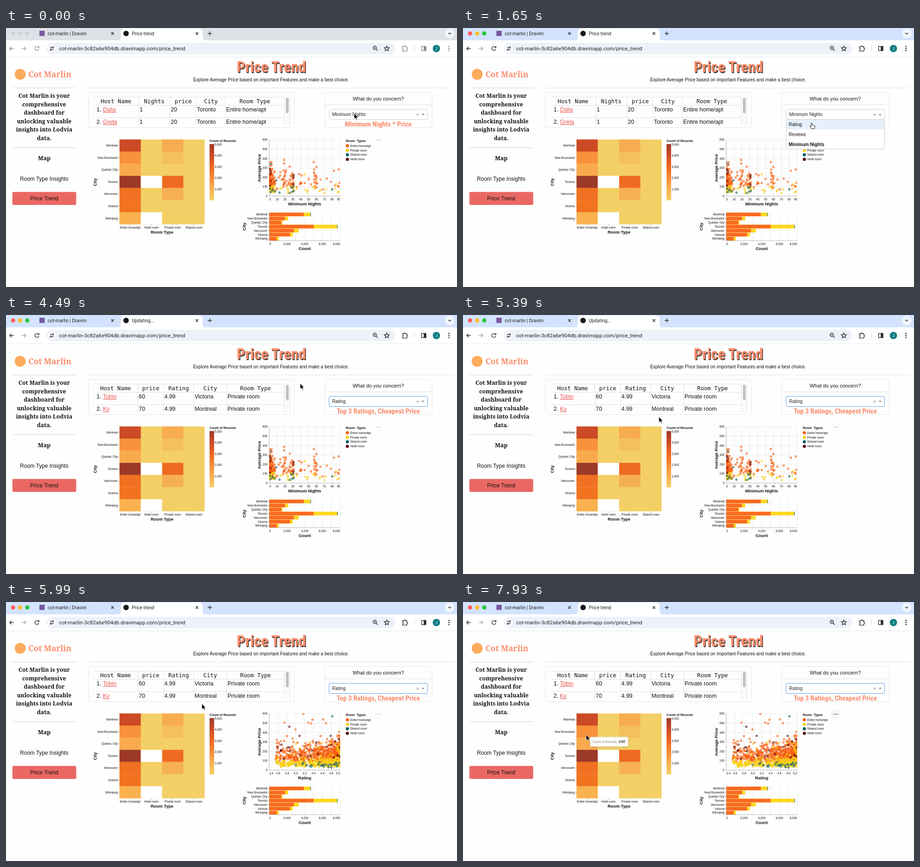
Animation of 986 by 568 pixels, one loop 8000 ms. Source, as an HTML page:

```html
<!DOCTYPE html>
<html lang="en">
<head>
<meta charset="utf-8">
<title>Price trend</title>
<style>
html, body { margin: 0; width: 100%; height: 100%; overflow: hidden; background: #fefefe; }
svg { display: block; }
text { font-family: "Liberation Sans", Arial, sans-serif; white-space: pre; fill: #111; }
.ui { font-family: Roboto, Inter, sans-serif; fill: #1f2023; }
.slab { font-family: "Noto Serif", "DejaVu Serif", serif; }
.mono { font-family: "DejaVu Sans Mono", monospace; }
.head { font-family: "Roboto Condensed", Roboto, "Open Sans Condensed", sans-serif; font-stretch: 75%; font-weight: 700; }
</style>
</head>
<body>
<script>
const LOOP = 8000;
const CORAL = '#fc8c6c';
const CITIES = ['Montreal', 'New Brunswick', 'Quebec City', 'Toronto', 'Vancouver', 'Victoria', 'Winnipeg'];
const ROOMS = ['Entire home/apt', 'Private room', 'Shared room', 'Hotel room'];
const ROOM_COLORS = ['#f95d0e', '#f9d013', '#0f5f6e', '#540d14'];

const add = (parent, tag, attrs = {}, content) => {
  const el = document.createElementNS('http://www.w3.org/2000/svg', tag);
  for (const key in attrs) el.setAttribute(key, attrs[key]);
  if (content !== undefined) el.textContent = content;
  parent.append(el);
  return el;
};
const svg = add(document.body, 'svg', { width: 986, height: 568, viewBox: '0 0 986 568' });
const group = (parent = svg, attrs) => add(parent, 'g', attrs);
const rect = (p, x, y, width, height, fill, extra) => add(p, 'rect', { x, y, width, height, fill, ...extra });
const disc = (p, cx, cy, r, fill, extra) => add(p, 'circle', { cx, cy, r, fill, ...extra });
const path = (p, d, stroke = '#e0e0e3', extra) => add(p, 'path', { d, stroke, fill: 'none', ...extra });
const text = (p, x, y, str, size, extra) => add(p, 'text', { x, y, 'font-size': size, ...extra }, str);
const mid = { 'text-anchor': 'middle' };
const end = { 'text-anchor': 'end' };
const bold = { 'font-weight': 700 };
const thin = { 'stroke-width': .7 };
const show = (el, on) => el.setAttribute('visibility', on ? 'visible' : 'hidden');

// Browser window
const strip = rect(svg, 0, 0, 986, 28, '#d3e3fd');
const LIGHTS = ['#fe5f57', '#febc2e', '#28c840'];
const lights = LIGHTS.map((c, i) => disc(svg, 15.5 + i * 15.5, 12, 4.7, c));
rect(svg, 73, 6, 11.5, 11.5, '#79589f', { rx: 1 });
text(svg, 91, 15.5, 'cot-marlin | Dravim', 10.2, { class: 'ui' });
path(svg, 'M243 28Q251 28 251 20V9Q251 1 259 1H422Q430 1 430 9V20Q430 28 438 28Z', 'none', { style: 'fill:#fff' });
disc(svg, 262.5, 12, 6, '#16181c');
const tabTitle = text(svg, 275, 15.5, '', 10.2, { class: 'ui' });
disc(svg, 970, 12, 10.5, '#f1f6fe');
rect(svg, 0, 27, 986, 36, '#fff');
path(svg, 'M0 63.5H986', '#e3e6ec');
rect(svg, 89, 32.5, 762, 25, '#edf1fa', { rx: 12.5 });
disc(svg, 100.5, 45, 8.5, '#fff');
text(svg, 116, 49, 'cot-marlin-3c82a6e904db.dravimapp.com/price_trend', 11.5, { class: 'ui' });

const line = { fill: 'none', stroke: '#2b2d31', 'stroke-width': 1.4 };
const icons = group(svg, line);
const dimIcons = group(svg, line);
const icon = (p, d) => add(p, 'path', { d });
icon(icons, 'M230.3 9.3l5.4 5.4m0-5.4l-5.4 5.4M414.8 9.3l5.4 5.4m0-5.4l-5.4 5.4');
icon(icons, 'M441 12h9M445.5 7.5v9M967 10.5l3 3l3-3');
icon(icons, 'M96 42.5h3.5M104 47.5h-3.5');
disc(icons, 102.3, 42.5, 1.6, 'none');
disc(icons, 98, 47.5, 1.6, 'none');
disc(icons, 806.3, 43.5, 3.7, 'none');
icon(icons, 'M809 46.2l3.8 3.8M804.6 43.5h3.4');
icon(icons, 'M832.5 39.5l1.6 3.5l3.9.4l-2.9 2.6l.8 3.8l-3.4-2l-3.4 2l.8-3.8l-2.9-2.6l3.9-.4z');
icon(dimIcons, 'M17 45H8.5M12 41l-4 4l4 4');
icon(dimIcons, 'M71 42a4.4 4.4 0 1 0 .7 4.2M72 39.8v3.3h-3.3');
icon(dimIcons, 'M867 41h3a1.7 1.7 0 0 1 3.4 0h3v3.2a1.7 1.7 0 0 1 0 3.4v3h-9.4v-3a1.7 1.7 0 0 0 0-3.4z');
icon(dimIcons, 'M908.5 40.5h9.5v9h-9.5z');
rect(dimIcons, 914, 40.5, 4, 9, '#2b2d31');
for (const y of [40.5, 45, 49.5]) disc(dimIcons, 968.5, y, .7, '#2b2d31');
path(svg, 'M34.5 45H43M39.5 41l4 4l-4 4', '#a3a6ab', { 'stroke-width': 1.4 });
path(svg, 'M892.5 38.5V51.5', '#c5d8f5');
disc(svg, 941, 45, 8, '#0f7d83');
text(svg, 941, 48, 'J', 8.5, { ...mid, style: 'fill:#fff' });

// Sidebar
disc(svg, 31, 101.5, 12, '#fdab5c');
text(svg, 49, 107.5, 'Cot Marlin', 17.4, { class: 'slab', ...bold, style: `fill:${CORAL}` });
path(svg, 'M14 131.5H153.5M14 262.5H153.5', '#d4d4d6');
['Cot Marlin is your', 'comprehensive', 'dashboard for', 'unlocking valuable', 'insights into Lodvia', 'data.']
  .forEach((str, i) => text(svg, 83.5, 153 + i * 18.55, str, 12.3, { class: 'slab', ...mid, 'font-weight': 600 }));
text(svg, 83.5, 290, 'Map', 12.6, { class: 'slab', ...mid, 'font-weight': 600 });
text(svg, 83.5, 335, 'Room Type Insights', 12, mid);
rect(svg, 14, 359.5, 139.5, 28.5, '#ea6864', { rx: 3 });
text(svg, 83.5, 378.3, 'Price Trend', 12, mid);

// Heading
text(svg, 581.5, 98.5, 'Price Trend', 33, { class: 'head', ...mid, style: 'fill:#3a3432' });
text(svg, 580, 97, 'Price Trend', 33, { class: 'head', ...mid, style: `fill:${CORAL}` });
text(svg, 579.5, 117, 'Explore Average Price based on important Features and make a best choice.', 10, mid);
path(svg, 'M180 131.5H979', '#e4e4e6');

// Host tables
rect(svg, 180.5, 141.5, 450, 77, '#fefefe', { rx: 4, stroke: '#e6e6e9' });
rect(svg, 610, 151, 10.5, 62, '#fafafa');
path(svg, 'M620.5 151V213');
rect(svg, 612, 153, 6, 34, '#c1c1c1', { rx: 3 });

function hostTable(heads, lines, centers, rows) {
  const g = group();
  path(g, 'M192 151.5H609M192 169.5H609M192 196.5H609' + [...lines, 608.5].map(x => `M${x} 151V213`).join(''));
  heads.forEach((h, i) => text(g, centers[i], 165, h, 12.4, { class: 'mono', ...mid }));
  rows.forEach(([host, ...cells], r) => {
    const y = 183.3 + r * 27;
    text(g, 198, y, `${r + 1}.`, 12.4);
    text(g, 212, y, host, 12.4, { style: 'fill:#e8544f;text-decoration:underline' });
    cells.forEach((c, i) => text(g, lines[i] + 1.8, y, c, 12.4));
  });
  return g;
}
const nightsTable = hostTable(['Host Name', 'Nights', 'price', 'City', 'Room Type'],
  [290.5, 358.5, 415.5, 479.5], [240.5, 324, 387.5, 448, 544],
  [['Dalia', '1', '20', 'Toronto', 'Entire home/apt'], ['Greta', '1', '20', 'Toronto', 'Entire home/apt']]);
const ratingTable = hostTable(['Host Name', 'price', 'Rating', 'City', 'Room Type'],
  [288.5, 344.5, 410.5, 482.5], [239.5, 316.5, 377.5, 446.5, 545.5],
  [['Tobin', '60', '4.99', 'Victoria', 'Private room'], ['Kv', '70', '4.99', 'Montreal', 'Private room']]);

// Charts
const charts = group();
const axis = (p, x, y, str, extra) => text(p, x, y, str, 6.4, extra);
const axisTitle = (p, x, y, str) => text(p, x, y, str, 9.25, { ...mid, ...bold });
const sideTitle = (x, y, str) => text(charts, 0, 0, str, 9.25, { ...mid, ...bold, transform: `translate(${x} ${y}) rotate(-90)` });

const heat = ['#cd4a26', '#f8913a', '#f9aa4d', '#9c3928', '#f17021', '#f2731f', '#fab150'];
const privateHeat = ['#f7ac50', '#f5bf5c', 0, '#ef6b22', '#f6b054', 0, 0];
const CELL = 46.5, ROW = 26.57, HEAT_X = 248.2, HEAT_Y = 244.5;
rect(charts, HEAT_X, HEAT_Y, 4 * CELL, 7 * ROW, '#f3cf65');
CITIES.forEach((city, i) => {
  const y = HEAT_Y + i * ROW, c = y + ROW / 2;
  const cell = (col, fill) => rect(charts, HEAT_X + col * CELL, y, CELL, ROW, fill);
  cell(0, heat[i]);
  if (privateHeat[i]) cell(2, privateHeat[i]);
  if (i === 3 || i === 6) cell(1, '#fff');
  axis(charts, 244, c + 2.4, city, end);
  path(charts, `M245 ${c}h3.2`, '#888', thin);
});
['Entire home/apt', 'Hotel room', 'Private room', 'Shared room'].forEach((room, i) => {
  const x = HEAT_X + (i + .5) * CELL;
  axis(charts, x, 440, room, mid);
  path(charts, `M${x} 430.5v3.2`, '#888', thin);
});
axisTitle(charts, 341, 451.3, 'Room Type');
sideTitle(198, 338, 'City');

const ramp = add(charts, 'linearGradient', { id: 'ramp', x2: 0, y2: 1 });
['#9c3928', '#cd4a26', '#ec6722', '#f58a35', '#f9b052', '#f3cf65'].forEach((c, i) =>
  add(ramp, 'stop', { offset: i / 5, 'stop-color': c }));
text(charts, 445, 250.3, 'Count of Records', 6.9, bold);
rect(charts, 445, 254.5, 10, 123.5, 'url(#ramp)');
for (let i = 0; i < 5; i++) axis(charts, 456, 257.5 + i * 24.5, `${5 - i},000`);

const LEFT = 575.5, WIDE = 155, TOP = 245, FLOOR = 368.7;
const priceY = p => FLOOR - p / 600 * (FLOOR - TOP);
for (let p = 0; p <= 600; p += 100) {
  path(charts, `M${LEFT - 3} ${priceY(p)}H${LEFT + WIDE}`, '#e1e1e1', thin);
  axis(charts, 571.5, priceY(p) + 2.3, p, end);
}
sideTitle(557, 307, 'Average Price');
text(charts, 743, 250.3, 'Room  Types', 7, bold);
ROOMS.forEach((room, i) => {
  disc(charts, 746.3, 258.3 + i * 9.9, 3.5, ROOM_COLORS[i]);
  axis(charts, 752.5, 260.6 + i * 9.9, room);
});

function random(seed) {
  return () => {
    seed = seed + 0x6d2b79f5 | 0;
    let v = Math.imul(seed ^ seed >>> 15, 1 | seed);
    v = v + Math.imul(v ^ v >>> 7, 61 | v) ^ v;
    return ((v ^ v >>> 14) >>> 0) / 4294967296;
  };
}
let rnd = random(11);
const spread = (median, sigma) => median * Math.exp(sigma * 2 * (rnd() + rnd() + rnd() - 1.5));
const make = (n, fn) => Array.from({ length: n }, fn);
rect(add(charts, 'clipPath', { id: 'plot' }), LEFT - 2, TOP - 1, WIDE + 2, FLOOR - TOP + 1);

// Each series is a list of [position along the axis from 0 to 1, price]
function scatter(title, ticks, series) {
  const g = group(charts);
  ticks.forEach((t, i) => {
    const last = ticks.length - 1, x = LEFT + i * WIDE / last;
    path(g, `M${x} ${TOP}V${FLOOR + 3}`, '#e1e1e1', thin);
    axis(g, x, 378.3, t, i === 0 ? {} : i === last ? end : mid);
  });
  path(g, `M${LEFT} ${TOP}V${FLOOR}H${LEFT + WIDE}`, '#999', thin);
  axisTitle(g, 653, 389, title);
  const plot = group(g, { 'clip-path': 'url(#plot)' });
  series.forEach((points, i) => path(plot, points.map(([u, price]) =>
    `M${(LEFT + u * WIDE - 1.7).toFixed(1)} ${priceY(price).toFixed(1)}a1.7 1.7 0 1 0 3.4 0a1.7 1.7 0 1 0-3.4 0`
  ).join(''), ROOM_COLORS[i], { 'stroke-width': 1.2 }));
  return g;
}

function nights() {
  const u = rnd(), v = rnd();
  if (u < .47) return 1 + Math.floor(v * v * 7);
  if (u < .63) return 26 + Math.floor(v * 6);
  if (u < .8) return 7 + Math.floor(v * 19);
  if (u < .87) return 57 + Math.floor(v * 4);
  return 30 + Math.floor(v * 60);
}
const stay = (median, sigma) => () => [nights() / 90, Math.min(360, spread(median, sigma))];
const nightsPlot = scatter('Minimum Nights', make(10, (_, i) => i * 10), [
  [...make(195, stay(165, .36)), [.21, 386], [.63, 362], [.665, 310], [.98, 283], [.87, 153], [.93, 116], [.97, 109]],
  [...make(58, stay(68, .3)), [.5, 232], [.72, 62], [.78, 34], [.98, 45]],
  [...make(12, stay(60, .4)), [.022, 342], [.1, 170]],
  [[.01, 283], [.022, 262], [.02, 160], [.014, 110], [.34, 222], [.34, 200], [.34, 125], [.02, 235]]
]);

rnd = random(29);
const rated = (median, sigma, power = 2.5) => () =>
  [1 - .91 * Math.pow(rnd(), power), Math.max(24, spread(median, sigma))];
const ratingPlot = scatter('Rating', make(9, (_, i) => (3.4 + i * .2).toFixed(1)), [
  [...make(760, rated(160, .34)), [.48, 598], [.215, 505], [.55, 505], [.61, 537], [.59, 495], [.76, 540], [.8, 500], [.37, 432], [.25, 362]],
  [...make(380, rated(72, .34, 2)), ...make(25, rated(210, .3))],
  [...make(28, rated(50, .25, 1.6)), [.89, 572]],
  make(26, rated(220, .32, 1.8))
]);

// Stacked bars: ends of each colour in pixels from the axis
const entire = [75.5, 34.5, 26.5, 97, 54, 45.5, 16.5];
const priv = [90, 41.5, 29, 148.5, 64.5, 51.5, 21];
for (let i = 0; i < 9; i++) {
  const x = LEFT + i * WIDE / 8;
  path(charts, `M${x} 404.5V469`, '#e1e1e1', thin);
  if (i % 2 === 0) axis(charts, x, 476.3, i ? `${i},000` : '0', i === 0 ? {} : i === 8 ? end : mid);
}
CITIES.forEach((city, i) => {
  const y = 408.9 + i * 8.86;
  rect(charts, LEFT, y - 4, priv[i], 8, '#fdd71f');
  rect(charts, LEFT, y - 4, entire[i], 8, '#fa6a20');
  if (i % 3 === 0 && i < 6) rect(charts, LEFT + priv[i], y - 4, 1.1, 8, ROOM_COLORS[2]);
  axis(charts, 571.5, y + 2.3, city, end);
  path(charts, `M${LEFT - 3} ${y}h3`, '#888', thin);
});
path(charts, `M${LEFT} 404.5V466.5H${LEFT + WIDE}`, '#999', thin);
axisTitle(charts, 653, 487, 'Count');
sideTitle(524, 435.5, 'City');

const menu = group(charts);
const menuRing = disc(menu, 814.5, 246, 8.2, '#fff', { stroke: '#cfcfcf', 'stroke-width': .9 });
for (const x of [811.3, 814.5, 817.7]) disc(menu, x, 246, 1.1, '#222');

// Feature picker
rect(svg, 696.5, 141.5, 235, 77, '#fefefe', { rx: 4, stroke: '#e6e6e9' });
path(svg, 'M697 168.5H931');
text(svg, 814, 158.6, 'What do you concern?', 11.2, mid);
const caption = text(svg, 814, 215.5, '', 15.2, { class: 'head', ...mid, style: `fill:${CORAL}` });
const glow = rect(svg, 705.8, 177.8, 216.4, 23.4, 'none', { rx: 3.5, stroke: '#dfecfc', 'stroke-width': 1.4 });
const field = rect(svg, 706.5, 178.5, 215, 22, '#fff', { rx: 3 });
const choice = text(svg, 713, 193.3, '', 10.2, { style: 'fill:#222' });
path(svg, 'M897.5 187.5l5 5m0-5l-5 5', '#8c8c8c');
const caretDown = path(svg, 'M908.5 188h6.5l-3.25 3.6z', 'none', { style: 'fill:#8c8c8c' });
const caretUp = path(svg, 'M908.5 191.6h6.5l-3.25-3.6z', 'none', { style: 'fill:#8c8c8c' });
const caret = rect(svg, 713, 183, 1, 12, '#111');
const list = group();
rect(list, 706.5, 200.5, 215, 65, '#fff', { rx: 2, stroke: '#ccc' });
const focus = rect(list, 707, 201, 214, 21.3, '#e5f0fb');
['Rating', 'Reviews', 'Minimum Nights'].forEach((o, i) =>
  text(list, 712, 215.3 + i * 21.6, o, 10, i === 2 ? bold : {}));

// Tooltip
const tip = group();
const tipBox = rect(tip, 0, 0, 75, 21, '#fffffff2', { rx: 2, stroke: '#dcdcdc', 'stroke-width': .8, style: 'filter:drop-shadow(.5px 1px 1.5px #0002)' });
text(tip, 5, 12.8, 'Count of Records', 6.8, { style: 'fill:#808080' });
const tipValue = text(tip, 62, 12.8, '', 6.8, bold);

// Pointers
const pointer = group();
const shapes = {
  arrow: path(pointer, 'M0 0V12.5L2.9 9.9L5 14.5L7.2 13.5L5.2 9.2H9Z', '#fff', { style: 'fill:#000' }),
  hand: path(pointer, 'M-1 1.2Q0-.5 1.3 1.2V5.2Q2.5 4.2 3.5 5.5Q4.7 4.6 5.5 6Q7 5.4 7.3 7V9.5Q7.2 11 6.2 12.8H-.2Q-1.5 10.5-3.8 7.9Q-3.7 6-1 8Z', '#111', { style: 'fill:#fff' }),
  beam: path(pointer, 'M-3-6Q0-6 0-4.5Q0-6 3-6M0-4.5V5M-3 6.5Q0 6.5 0 5Q0 6.5 3 6.5M-1.5 2h3', '#111')
};

const moves = [
  [0, 761, 187, 'arrow'], [1350, 761, 195, 'arrow'], [1500, 762, 205, 'hand'], [1650, 762, 208, 'hand'],
  [2840, 761, 210, 'beam'], [3140, 757, 211, 'beam'],
  [3440, 770, 195, 'arrow'], [3590, 800, 168, 'arrow'], [3740, 805, 142, 'arrow'], [3890, 765, 122, 'arrow'], [4040, 738, 106, 'arrow'],
  [4340, 705, 74, 'arrow'], [4490, 643, 150, 'arrow'], [4640, 420, 166, 'arrow'], [4790, 240, 178, 'hand'],
  [4940, 220, 181, 'hand'], [5090, 300, 204, 'arrow'], [5240, 427, 222, 'arrow'], [5390, 428, 223, 'arrow'],
  [6440, 410, 236, 'arrow'], [6590, 370, 250, 'arrow'], [6740, 305, 256, 'arrow'], [6880, 278, 262, 'arrow'],
  [7030, 274, 264, 'arrow'], [7180, 274, 262, 'arrow'], [7780, 271, 276, 'arrow'], [7930, 269, 291, 'arrow']
];
const tips = [[0], [6590, 379, 255, 1021], [6740, 302, 262, 11], [7030, 283, 270, 3908], [7780, 280, 281, 1757], [7930, 278, 296, 1757]];
const at = (steps, t) => steps.findLast(s => t >= s[0]);

function render(t) {
  const active = t >= 150, open = t >= 600 && t < 2840, picked = t >= 2840, loaded = t >= 5990;
  strip.setAttribute('fill', active ? '#d3e3fd' : '#dee1e6');
  lights.forEach((el, i) => el.setAttribute('fill', active ? LIGHTS[i] : '#d0d2d5'));
  dimIcons.setAttribute('opacity', active ? 1 : .55);
  tabTitle.textContent = picked && !loaded ? 'Updating...' : 'Price trend';

  show(list, open);
  focus.setAttribute('y', t < 1500 ? 244 : 201);
  show(caretUp, open);
  show(caretDown, !open);
  show(caret, open && t >= 2240);
  show(glow, picked);
  field.setAttribute('stroke', picked ? '#72adea' : '#d0d0d0');
  choice.textContent = picked ? 'Rating' : 'Minimum Nights';

  const updated = t >= 2990;
  show(nightsTable, !updated);
  show(ratingTable, updated);
  caption.textContent = updated ? 'Top 3 Ratings, Cheapest Price' : 'Minimum Nights * Price';

  charts.setAttribute('display', t >= 5690 && !loaded ? 'none' : 'inline');
  show(nightsPlot, !loaded);
  show(ratingPlot, loaded);
  menu.setAttribute('opacity', t >= 6440 ? 1 : .3);
  menuRing.setAttribute('stroke-opacity', picked ? 1 : 0);

  const [, tx, ty, value] = at(tips, t);
  show(tip, value);
  if (value) {
    tip.setAttribute('transform', `translate(${tx} ${ty})`);
    tipBox.setAttribute('width', 67 + 4 * String(value).length);
    tipValue.textContent = value;
  }

  const [, x, y, kind] = at(moves, t);
  pointer.setAttribute('transform', `translate(${x} ${y})`);
  for (const name in shapes) show(shapes[name], name === kind);
}

const start = performance.now();
function tick() {
  render((performance.now() - start) % LOOP);
  requestAnimationFrame(tick);
}
tick();
</script>
</body>
</html>
```
